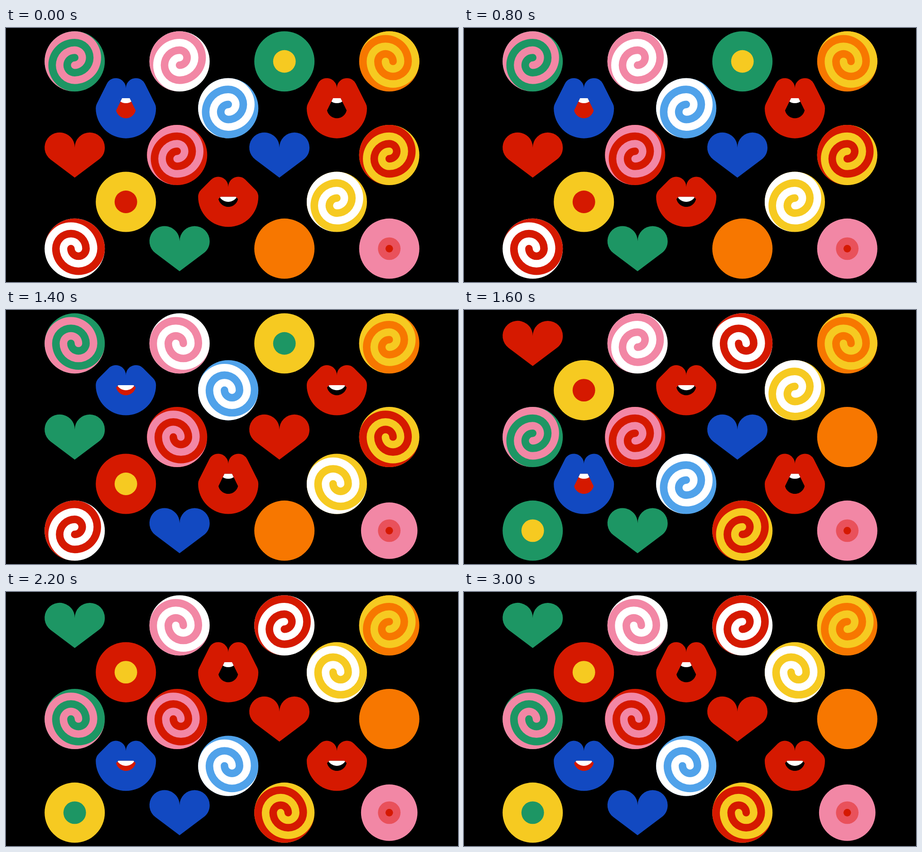
These frames come from a looping animation (998x561 px, 3200 ms). An HTML page with a canvas:

```html
<!DOCTYPE html>
<html lang="en">
<head>
<meta charset="utf-8">
<title>Candy grid</title>
<style>
  html, body { margin: 0; width: 100%; height: 100%; overflow: hidden; background: #000; }
  canvas { display: block; width: 998px; height: 561px; }
</style>
</head>
<body>
<canvas id="stage"></canvas>
<script>
const W = 998, H = 561, STEP = 200, STEPS = 16;
const PI = Math.PI, Q = PI / 2;
const UNIT = 66.5 / 24; // every shape is drawn in a cell of radius 24

const green = '#1d9664', pink = '#f287a5', orange = '#f77700', yellow = '#f6ca21',
      blue = '#1249c1', red = '#d51900', sky = '#50a2ea', white = '#fff',
      coral = '#e9515b', black = '#000';

const canvas = document.getElementById('stage');
const ctx = canvas.getContext('2d');
const dpr = window.devicePixelRatio || 1;
canvas.width = Math.round(W * dpr);
canvas.height = Math.round(H * dpr);

function disc(color, r, y = 0) {
  ctx.fillStyle = color;
  ctx.beginPath();
  ctx.arc(0, y, r, 0, 2 * PI);
  ctx.fill();
}

// Two interlocked arms built from half circles, a quarter turn per step
const spiral = (back, front, turn) => step => {
  ctx.rotate((turn + step) * Q);
  disc(back, 24);
  ctx.fillStyle = front;
  ctx.beginPath();
  ctx.arc(0, 0, 24, Q, 3 * Q);
  for (const r of [21, 15, 9, 3]) {
    if (r % 12 === 9) ctx.arc(0, -3, r, -Q, Q);
    else ctx.arc(0, 3, r, Q, 3 * Q);
  }
  for (const r of [3, 9, 15, 21]) {
    if (r % 12 === 3) ctx.arc(0, -3, r, Q, -Q, true);
    else ctx.arc(0, 3, r, 3 * Q, Q, true);
  }
  ctx.fill();
};

const donut = (outer, inner) => (step, alt) => {
  disc(alt ? inner : outer, 24);
  disc(alt ? outer : inner, 9);
};

const heart = (first, second) => (step, alt) => {
  const a = 2 * Math.atan2(12, 24) - PI; // where the side leaves the lobe
  ctx.fillStyle = alt ? second : first;
  ctx.beginPath();
  ctx.moveTo(0, 18);
  ctx.arc(-12, -6, 12, -a, 2 * PI);
  ctx.arc(12, -6, 12, PI, PI + a + 2 * PI);
  ctx.closePath();
  ctx.fill();
};

const lips = (skin, inside, startOpen) => (step, alt) => {
  const open = startOpen !== alt;
  const cy = open ? 0 : -4, ly = open ? -16 : -12;
  const top = open ? -8 : -4, w = open ? 3 : 6;
  const a = Math.atan2(8, cy - ly);

  ctx.fillStyle = skin;
  ctx.beginPath();
  ctx.arc(0, cy, 24, 0, PI);
  ctx.arc(-16, cy, 8, PI, PI + a);
  ctx.arc(-8, ly, 8, PI + a, 2 * PI);
  ctx.arc(8, ly, 8, PI, 2 * PI - a);
  ctx.arc(16, cy, 8, 2 * PI - a, 2 * PI);
  ctx.fill();

  ctx.fillStyle = inside;
  ctx.beginPath();
  ctx.moveTo(-w, top);
  ctx.lineTo(w, top);
  ctx.arc(0, cy, 8, 0.225, PI - 0.225);
  ctx.closePath();
  ctx.fill();
  ctx.clip();
  disc(white, 8, top - 4);
};

const plain = color => () => disc(color, 24);

const target = () => (step, alt) => {
  disc(pink, alt ? 22.5 : 24);
  disc(coral, 9);
  disc(red, 3);
};

const row = i => 73.75 + i * 103.4;
const col = i => 151.7 + i * 231.5;
const at = (x, r) => [x, row(r)];
const A = 264.7, B = 490.7, C = 730.5;

// shape, place in the first half, place in the second half (if it moves)
const items = [
  [spiral(green, pink, 0), at(col(0), 0), at(col(0), 2)],
  [spiral(white, pink, 0), at(col(1), 0)],
  [donut(green, yellow), at(col(2), 0), at(col(0), 4)],
  [spiral(orange, yellow, 1), at(col(3), 0)],
  [lips(blue, red, true), at(A, 1), at(A, 3)],
  [spiral(sky, white, 0), at(B, 1), at(B, 3)],
  [lips(red, black, true), at(C, 1), at(C, 3)],
  [heart(red, green), at(col(0), 2), at(col(0), 0)],
  [spiral(red, pink, 0), at(377.8, 2)],
  [heart(blue, red), at(603.6, 2)],
  [spiral(yellow, red, 0), at(col(3), 2), at(col(2), 4)],
  [donut(yellow, red), at(A, 3), at(A, 1)],
  [lips(red, black, false), at(B, 3), at(B, 1)],
  [spiral(yellow, white, 0), at(C, 3), at(C, 1)],
  [spiral(white, red, 1), at(col(0), 4), at(col(2), 0)],
  [heart(green, blue), at(col(1), 4)],
  [plain(orange), at(col(2), 4), at(col(3), 2)],
  [target(), at(col(3), 4)]
];

function draw(step) {
  const alt = step % 4 > 1;
  ctx.setTransform(dpr, 0, 0, dpr, 0, 0);
  ctx.fillStyle = black;
  ctx.fillRect(0, 0, W, H);
  for (const [shape, first, second = first] of items) {
    const [x, y] = step < STEPS / 2 ? first : second;
    ctx.save();
    ctx.translate(x, y);
    ctx.scale(UNIT, UNIT);
    shape(step % 4, alt);
    ctx.restore();
  }
}

const start = performance.now();
function tick() {
  const t = Math.max(0, performance.now() - start);
  draw(Math.floor(t / STEP) % STEPS);
  requestAnimationFrame(tick);
}
tick();
</script>
</body>
</html>
```
